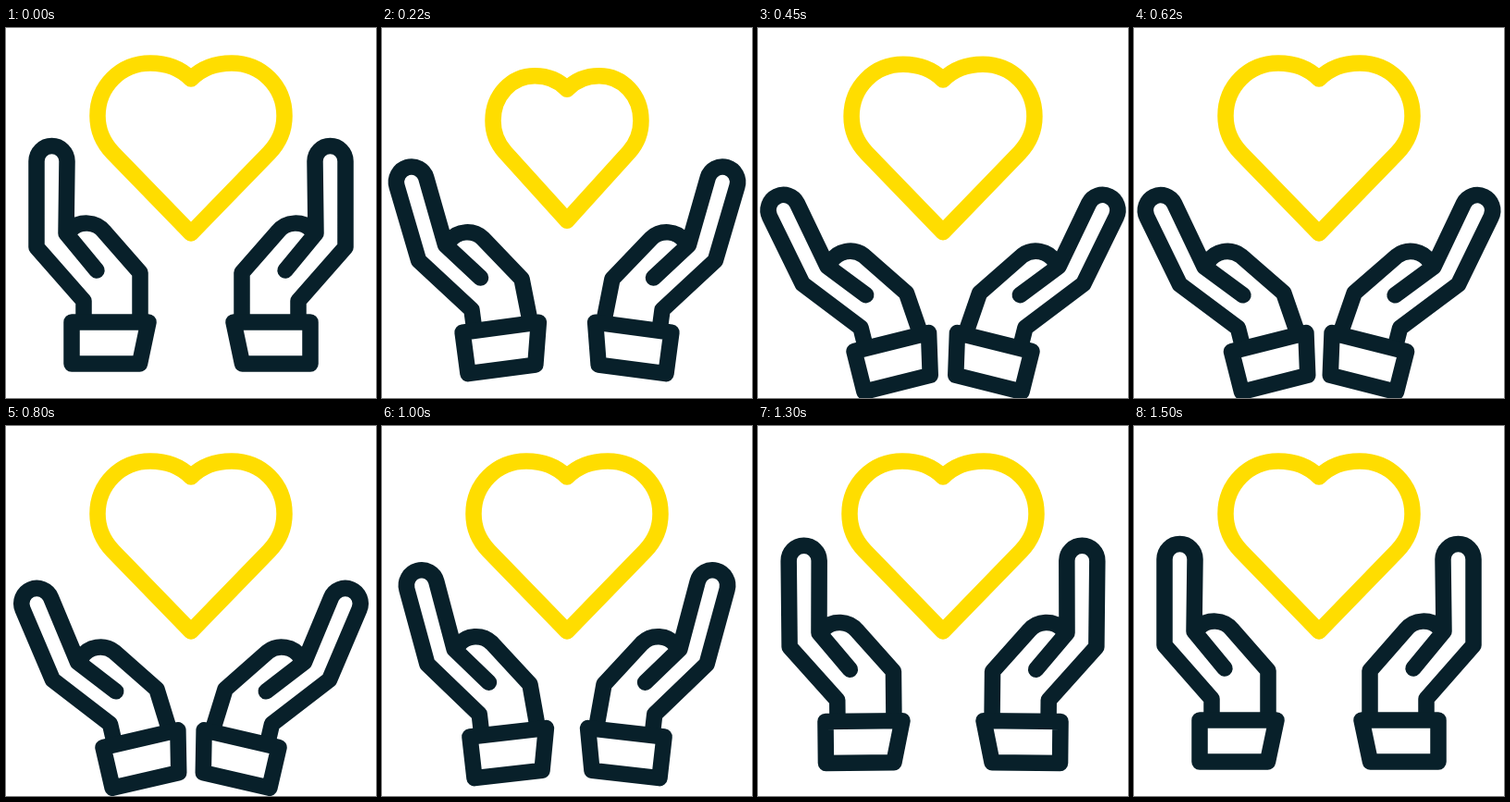
Write an HTML page that moves like this. It is 400 px wide and 400 px high and loops after 1520 ms.

```html
<!DOCTYPE html>
<html lang="en">
<head>
<meta charset="utf-8">
<title>Caring hands</title>
<style>
  html, body { margin: 0; height: 100%; overflow: hidden; background: #fff; }
  svg { display: block; width: 100vw; height: 100vh; }
  path { fill: none; stroke-width: 17.5; stroke-linecap: round; stroke-linejoin: round; }
</style>
</head>
<body>
<svg viewBox="0 0 400 400">
  <path id="heart" stroke="#fd0"/>
  <g stroke="#08202a">
    <g id="hand">
      <path id="palm"/>
      <path d="M71 318H154L144.500 363H71Z"/>
    </g>
    <use href="#hand" transform="matrix(-1 0 0 1 400 0)"/>
  </g>
</svg>
<script>
const LOOP = 1520;
const TIMES = [0, 110, 220, 450, 550, 800, 1000, 1300, 1500];
const TRACKS = {
  angle:  [0, 2.4, 7.5, 14, 14.3, 13, 6.5, 0.6, 0],
  x:      [0, 4, 16, 33, 34.5, 34, 24, 2, 0],
  y:      [0, 2.5, 11, 31.5, 32, 29.5, 18, 1.5, 0],
  bend:   [0, 0.25, 0.75, 1, 1, 0.85, 0.75, 0, 0],
  shrink: [0, -0.73, 1, 0.1, 0, 0, 0, 0, 0]
};
const $ = id => document.getElementById(id);

// Monotone cubic interpolation: smooth, without overshooting the keys.
function sample(values, t) {
  const last = TIMES.length - 1;
  if (t >= TIMES[last]) return values[last];
  const i = TIMES.findIndex(time => time > t) - 1;
  const slope = k => (values[k + 1] - values[k]) / (TIMES[k + 1] - TIMES[k]);
  const tangent = k => {
    if (k === 0 || k === last) return 0;
    const a = slope(k - 1), b = slope(k);
    return a * b > 0 ? 2 * a * b / (a + b) : 0;
  };
  const span = TIMES[i + 1] - TIMES[i], u = (t - TIMES[i]) / span, v = 1 - u;
  return values[i] * (1 + 2 * u) * v * v + values[i + 1] * (3 - 2 * u) * u * u
    + span * u * v * (tangent(i) * v - tangent(i + 1) * u);
}

function heartPath(shrink) {
  const p = (x, y) => `${200 + x * (1 - 0.208 * shrink)} ${130 + y * (1 - 0.15 * shrink)} `;
  const half = s =>
    `C${p(s * 11, -86)}${p(s * 27, -92)}${p(s * 44, -92)}` +
    `C${p(s * 76, -92)}${p(s * 101, -67)}${p(s * 101, -35)}` +
    `C${p(s * 101, -20)}${p(s * 95, -6)}${p(s * 84.500, 5)}L${p(0, 92)}`;
  return `M${p(0, -75)}${half(-1)}M${p(0, -75)}${half(1)}`;
}

function palmPath(bend) {
  const tilt = 0.21 * bend, c = 16.5 * Math.cos(tilt), s = 16.5 * Math.sin(tilt);
  const x = 49.5 - 15.8 * bend, y = 144 + 7.4 * bend;
  return `M84 316V295L${33 + 1.5 * bend} ${237 - 3 * bend}L${x - c} ${y + s}` +
    `A16.5 16.5 0 0 1 ${x + c} ${y - s}L65 222L98 262` +
    `M70 218C80 208 97 209 106 220L${145 - 4 * bend} ${264.5 + 6 * bend}L145 316`;
}

function draw(now) {
  const t = now % LOOP, pose = {};
  for (const name in TRACKS) pose[name] = sample(TRACKS[name], t);
  $('heart').setAttribute('d', heartPath(pose.shrink));
  $('palm').setAttribute('d', palmPath(pose.bend));
  $('hand').setAttribute('transform',
    `translate(${pose.x} ${pose.y}) rotate(${-pose.angle} 71 318)`);
}

const start = performance.now();
function tick() {
  draw(performance.now() - start);
  requestAnimationFrame(tick);
}
tick();
</script>
</body>
</html>
```
